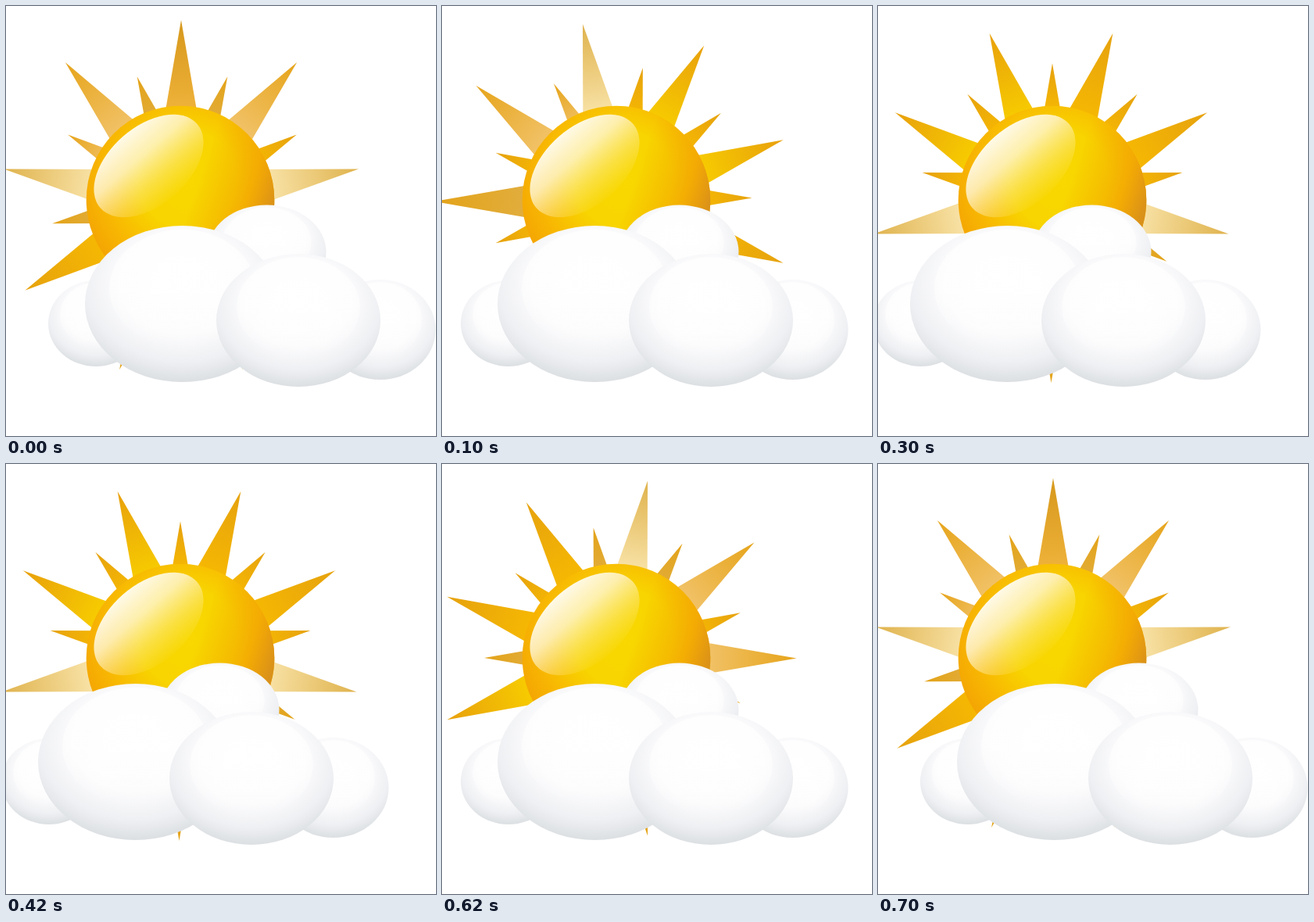
These frames come from a looping animation (550 px wide and 550 px high, 0.8 s). An HTML page:

```html
<!DOCTYPE html>
<html lang="en">
<head>
<meta charset="utf-8">
<title>Sun and clouds</title>
<style>
  html, body { margin: 0; width: 100%; height: 100%; overflow: hidden; background: #fff; }
  svg { display: block; width: 100vw; height: 100vh; }
</style>
</head>
<body>
<svg viewBox="0 0 550 550">
  <defs id="defs">
    <radialGradient id="disc" gradientUnits="userSpaceOnUse" cx="232" cy="222" r="150">
      <stop offset="0" stop-color="#f8d800"/>
      <stop offset=".42" stop-color="#f8d400"/>
      <stop offset=".72" stop-color="#f8b802"/>
      <stop offset="1" stop-color="#f3a103"/>
    </radialGradient>
    <linearGradient id="shade" gradientUnits="userSpaceOnUse" x1="245" y1="225" x2="342" y2="258">
      <stop offset="0" stop-color="#f0a000" stop-opacity="0"/>
      <stop offset=".65" stop-color="#f2a004" stop-opacity=".65"/>
      <stop offset="1" stop-color="#d9911a"/>
    </linearGradient>
    <!-- runs across the short axis of the tilted ellipse -->
    <linearGradient id="gloss" x1="0" y1="0" x2="0" y2="1">
      <stop offset="0" stop-color="#fffdf4" stop-opacity=".95"/>
      <stop offset=".35" stop-color="#fff8dc" stop-opacity=".78"/>
      <stop offset=".7" stop-color="#fff2b8" stop-opacity=".36"/>
      <stop offset="1" stop-color="#ffeea0" stop-opacity=".04"/>
    </linearGradient>
    <radialGradient id="puff" cx=".5" cy=".37" r=".64">
      <stop offset="0" stop-color="#fff"/>
      <stop offset=".5" stop-color="#fcfcfd"/>
      <stop offset=".78" stop-color="#eff0f3"/>
      <stop offset="1" stop-color="#dadee1"/>
    </radialGradient>
    <linearGradient id="shine" x1="0" y1="0" x2="0" y2="1">
      <stop offset="0" stop-color="#fff" stop-opacity=".75"/>
      <stop offset=".5" stop-color="#fff" stop-opacity=".55"/>
      <stop offset="1" stop-color="#fff" stop-opacity="0"/>
    </linearGradient>
  </defs>
  <g id="rays"></g>
  <circle cx="223" cy="248" r="120.3" fill="url(#disc)"/>
  <circle cx="223" cy="248" r="120.3" fill="url(#shade)"/>
  <ellipse rx="82" ry="50" transform="translate(182.5 204.5) rotate(-41)" fill="url(#gloss)"/>
  <g id="clouds"></g>
</svg>
<script>
const NS = 'http://www.w3.org/2000/svg';
const $ = id => document.getElementById(id);

function add(parent, tag, attrs) {
  const el = document.createElementNS(NS, tag);
  for (const k in attrs) el.setAttribute(k, attrs[k]);
  return parent.appendChild(el);
}

// Ray tints, tip to base
const tints = {
  a: ['#e4a318', '#e1ad3c'],
  d: ['#d6981c', '#efb23a'],
  l: ['#e6a41a', '#f1c268'],
  o: ['#e6a20e', '#f6b802'],
  p: ['#dfb24c', '#f8e2a6'],
  y: ['#e8a00c', '#f7cc00']
};
for (const key in tints) {
  const grad = add($('defs'), 'linearGradient', { id: 'ray-' + key, x1: 0, y1: 0, x2: 0, y2: 1 });
  tints[key].forEach((color, i) =>
    add(grad, 'stop', { offset: i * 0.82, 'stop-color': color }));
}

// Each ring has nine rays, 40 degrees apart, pointing up before rotation
function ring(radius, phase) {
  const inner = 90, half = (radius - inner) * 0.173;
  const points = `0,${-radius} ${half},${-inner} ${-half},${-inner}`;
  const group = add($('rays'), 'g', {});
  const rays = Array.from({ length: 9 }, (_, i) =>
    add(group, 'polygon', { points, transform: `rotate(${i * 40 + phase})` }));
  return (center, angle, keys) => {
    group.setAttribute('transform', `translate(${center}) rotate(${angle})`);
    rays.forEach((ray, i) => ray.setAttribute('fill', `url(#ray-${keys[i]})`));
  };
}
const setLong = ring(230.5, 0);
const setShort = ring(169, 20);

function cloud(cx, cy, rx, ry) {
  add($('clouds'), 'ellipse', { cx, cy, rx, ry, fill: 'url(#puff)' });
  add($('clouds'), 'ellipse', {
    cx, cy: cy - ry * 0.2, rx: rx * 0.75, ry: ry * 0.75, fill: 'url(#shine)'
  });
}
cloud(115, 406, 61, 55);
cloud(333.5, 314.5, 76, 60);
cloud(478.5, 414, 71, 64);
cloud(225.5, 381, 124.5, 100);
cloud(374, 402, 105, 85);

const poses = [
  { long: [224, 248.5], short: [225.5, 249], tint: 'dlpooaopl', small: 'aoaoooala' },
  { long: [220, 250], short: [227.5, 245.5], tint: 'pyyooooal', small: 'ooooooool' },
  { long: [221.5, 251.5], short: [223, 242.3], tint: 'yoopoaopy', small: 'oooaooooo' },
  { long: [223, 248.5], short: [223, 248], tint: 'oplloaoyo', small: 'aaoooooao' }
];
const LOOP = 800, STEP = 200;
let shown = -1;

// Poses are held for 200 ms; the first one straddles the loop point
function draw(ms) {
  const n = Math.floor((ms % LOOP + STEP / 2) / STEP) % poses.length;
  if (n === shown) return;
  shown = n;
  const pose = poses[n];
  setLong(pose.long, -10 * n, pose.tint);
  setShort(pose.short, -10 * n, pose.small);
  const shift = 30 * (Math.abs(n - 2) - 2);
  $('clouds').setAttribute('transform', `translate(${shift} 0)`);
}

const start = performance.now();
function tick(now) {
  draw(Math.max(0, now - start));
  requestAnimationFrame(tick);
}
draw(0);
requestAnimationFrame(tick);
</script>
</body>
</html>
```
